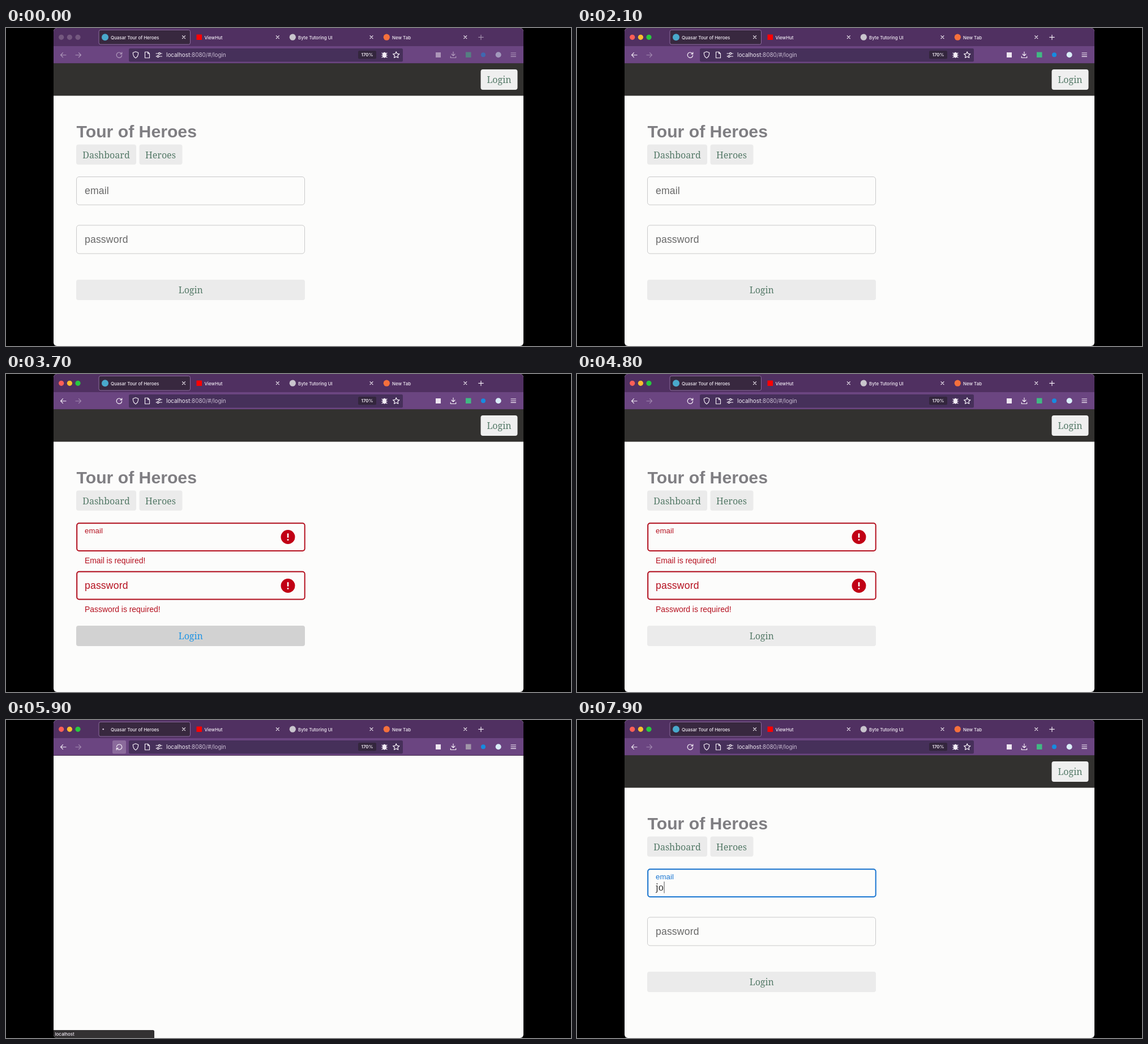
Animation, 998 px wide and 561 px high, one loop 8000 ms. Source, as an HTML page:

```html
<!DOCTYPE html>
<html lang="en">
<head>
<meta charset="utf-8">
<title>Login form</title>
<style>
html, body { margin: 0; width: 100%; height: 100%; overflow: hidden; background: #000; }
svg { display: block; width: 998px; height: 561px; }
text { white-space: pre; }
.ui { font-family: Inter, sans-serif; font-size: 7.9px; font-weight: 500; fill: #f3edf6; }
.url { font-size: 9.9px; font-weight: 400; }
.sans { font-family: "Liberation Sans", Arial, sans-serif; }
.serif { font-family: "Noto Serif", serif; font-size: 16px; fill: #557a68; }
.mid { text-anchor: middle; }
.label { font-size: 17.6px; letter-spacing: .00937em; fill: #686868; }
.msg { font-size: 13.9px; fill: #b5101f; }
.line { fill: none; stroke: #f6f0f8; stroke-width: 1.15; stroke-linecap: round; stroke-linejoin: round; }
.btn { fill: #ebebeb; }
.base { fill: none; stroke: #c9c9c9; }
.over { fill: none; stroke: #b5101f; stroke-width: 2; }
</style>
</head>
<body>
<svg viewBox="0 0 998 561">
  <defs>
    <clipPath id="window"><rect x="84" width="830" height="561" rx="6"/></clipPath>
    <g id="cross"><path class="line" d="M-2.5-2.5l5 5M2.5-2.5l-5 5"/></g>
    <g id="alert">
      <circle r="12.5" fill="#c10015"/>
      <path d="M-1.3-6.3h2.6v7.6h-2.6zM-1.3 3.7h2.6v2.6h-2.6z" fill="#fff"/>
    </g>
  </defs>
  <g clip-path="url(#window)">
    <rect x="84" width="830" height="561" fill="#fcfcfb"/>
    <rect x="84" width="830" height="32" fill="#503061"/>
    <rect x="84" y="32" width="830" height="30.5" fill="#6b4581"/>
    <rect x="84" y="62" width="830" height="1" fill="#47304f"/>

    <g id="lights">
      <circle cx="97.7" cy="16.3" r="4.6"/>
      <circle cx="112.4" cy="16.3" r="4.6"/>
      <circle cx="127" cy="16.3" r="4.6"/>
    </g>

    <rect x="164" y="3.5" width="161.5" height="25.5" rx="3" fill="#38283f" stroke="#8c6a9e"/>
    <circle id="favicon" cx="175" cy="16.2" r="6" fill="#49a9cc"/>
    <circle id="busy" cx="171.7" cy="16.2" r="1.3" fill="#d8cbe0"/>
    <rect x="336.5" y="11.5" width="9.5" height="9.5" fill="#f00"/>
    <circle cx="506.3" cy="16.2" r="5.6" fill="#c9c5cd"/>
    <circle cx="672.3" cy="16.2" r="5.6" fill="#f5703c"/>
    <g class="ui">
      <text x="185" y="19.6">Quasar Tour of Heroes</text>
      <text x="350.5" y="19.6">ViewHut</text>
      <text x="516" y="19.6">Byte Tutoring UI</text>
      <text x="682" y="19.6">New Tab</text>
    </g>
    <use href="#cross" x="314" y="16.2"/>
    <use href="#cross" x="479.8" y="16.2"/>
    <use href="#cross" x="645.5" y="16.2"/>
    <use href="#cross" x="811.3" y="16.2"/>

    <rect id="reloadBg" x="188" y="36" width="24" height="23.5" rx="2.5" fill="#8b6b9c"/>
    <g id="tools">
      <path class="line" d="M839 12.2v8.4M834.8 16.4h8.4"/>
      <path class="line" d="M106 47.7h-9.5m4-4l-4 4l4 4"/>
      <path id="reload" class="line" d="M203.6 44.8a4.7 4.7 0 1 0 1 3.3M204.8 42.7v3.1h-3.1"/>
      <rect x="759" y="43" width="9" height="9" fill="#eee6f1"/>
      <path class="line" d="M790 42v7m-3-3l3 3l3-3M785.3 50v2.5h9.4V50"/>
      <rect id="addon" x="812" y="42.5" width="9.5" height="9.5"/>
      <circle cx="843" cy="47.2" r="4" fill="#168be0"/>
      <circle cx="869.7" cy="47.2" r="5" fill="#d9edf8"/>
      <path class="line" d="M892 44h8.5M892 47.2h8.5M892 50.4h8.5"/>
    </g>
    <path id="forward" class="line" d="M123 47.7h9.5m-4-4l4 4l-4 4" opacity=".4"/>

    <rect x="217" y="36" width="484" height="23.5" rx="2.5" fill="#46305a"/>
    <path class="line" d="M229 41.7l4.7 1.8c0 5-1.4 7.7-4.7 9.4c-3.300-1.700-4.700-4.400-4.700-9.400z"/>
    <path class="line" d="M245.500 42.200h5l3 3v7.500h-8zM250.500 42.200v3h3"/>
    <path class="line" d="M265 45h4M273 45h2.500M265 50h1.500M270.500 50h5"/>
    <circle class="line" cx="271" cy="45" r="1.6"/>
    <circle class="line" cx="268.500" cy="50" r="1.6"/>
    <text class="ui url" x="283" y="51.300">localhost<tspan fill="#c9bcd2">:8080/#/login</tspan></text>
    <rect x="622" y="40" width="32" height="14.500" rx="2.500" fill="#33263d"/>
    <text class="ui mid" x="638" y="50.300" style="font-weight:600">170%</text>
    <path class="line" d="M664 44l2 1.500M673 44l-2 1.500M663.500 48h10M664 52l2-1.500M673 52l-2-1.500"/>
    <ellipse cx="668.500" cy="47.700" rx="3.400" ry="5" fill="#f3edf6"/>
    <path class="line" d="M689.200 41.700l1.700 3.700l4 .4l-3 2.700l.9 4l-3.600-2.100l-3.600 2.100l.9-4l-3-2.700l4-.4z"/>

    <g id="page">
      <rect x="84" y="62.500" width="830" height="57" fill="#32312f"/>
      <rect x="838.500" y="73" width="65" height="36" rx="4" fill="#efefef"/>
      <text class="serif mid" x="871" y="97">Login</text>
      <text class="sans" x="124.500" y="193" font-size="30.200" font-weight="700" fill="#7f7e82">Tour of Heroes</text>
      <rect class="btn" x="124" y="205.500" width="106" height="35.500" rx="4"/>
      <rect class="btn" x="235.500" y="205.500" width="76" height="35.500" rx="4"/>
      <text class="serif mid" x="177" y="229.700">Dashboard</text>
      <text class="serif mid" x="273" y="229.700">Heroes</text>

      <rect class="base" x="124.500" y="262.500" width="403" height="49.500" rx="4.500"/>
      <rect class="base" x="124.500" y="348" width="403" height="50" rx="4.500"/>
      <rect id="emailBox" class="over" x="125.200" y="263.300" width="402.500" height="48.700" rx="4"/>
      <rect id="passBox" class="over" x="125.200" y="348.800" width="402.500" height="48.700" rx="4"/>
      <text id="email" class="sans label" x="139">email</text>
      <text id="password" class="sans label" x="139" y="379">password</text>
      <text id="typed" class="serif" x="139" y="301" style="fill:#333"></text>
      <path id="caret" stroke="#555" d="M0 285v20.500"/>
      <g id="alerts">
        <use href="#alert" x="498" y="287.500"/>
        <use href="#alert" x="498" y="373.500"/>
      </g>
      <g id="messages">
        <text class="sans msg" x="139" y="334">Email is required!</text>
        <text class="sans msg" x="139" y="420.300">Password is required!</text>
      </g>
      <rect id="submit" x="124" y="444" width="404" height="36" rx="4"/>
      <text id="submitText" class="serif mid" x="326.300" y="468.300">Login</text>
    </g>

    <g id="status">
      <path d="M84 547h175.500a2.500 2.500 0 0 1 2.500 2.500V561H84z" fill="#333132"/>
      <text class="ui" x="86.500" y="557.200">localhost</text>
    </g>
  </g>
</svg>
<script>
const LOOP = 8000;
const RED = '#b5101f', BLUE = '#1976d2', GREY = '#686868';
const ACTIVE = 500;
const HOVER = [2400, 3900];
const FAIL = 2840, FAIL_TEXT = 2900;
const RELOAD_HOVER = [5300, 6300];
const BLANK = [5500, 6100];
const FOCUS = 7200;
const KEYS = [7650, 7850];
const TEXT = 'jo';

const $ = id => document.getElementById(id);
const within = (t, [from, to]) => t >= from && t < to;
const show = (id, on) => $(id).setAttribute('opacity', +on);
const fill = (id, color) => { $(id).style.fill = color; };

// cubic-bezier(.4, 0, .2, 1)
function ease(x) {
  if (x <= 0) return 0;
  if (x >= 1) return 1;
  let lo = 0, hi = 1, s;
  for (let i = 0; i < 20; i++) {
    s = (lo + hi) / 2;
    const r = 1 - s;
    if (1.2 * r * r * s + .6 * r * s * s + s ** 3 < x) lo = s; else hi = s;
  }
  return 3 * s * s - 2 * s ** 3;
}

function drawWindow(t) {
  const active = t >= ACTIVE;
  const loading = within(t, BLANK);
  const colors = active ? ['#fe5f57', '#febc2e', '#28c840'] : ['#74587f', '#74587f', '#74587f'];
  [...$('lights').children].forEach((dot, i) => dot.setAttribute('fill', colors[i]));
  show('tools', active ? 1 : .5);
  show('forward', active ? .4 : .5);
  show('favicon', !loading);
  show('busy', loading);
  fill('addon', loading ? '#a095a8' : '#41b883');
  show('reloadBg', within(t, RELOAD_HOVER));
  $('reload').setAttribute('transform', `rotate(${loading ? 180 : 0} 200 47.7)`);
  show('page', !loading);
  show('status', loading);
}

function drawForm(t) {
  const failed = t >= FAIL && t < BLANK[0];
  const focused = t >= FOCUS;
  const start = failed ? FAIL : FOCUS;
  const k = failed || focused ? ease((t - start) / 360) : 0;
  const tint = failed ? RED : focused ? BLUE : GREY;

  const label = $('email');
  label.setAttribute('y', 293 - 12 * k);
  label.style.fontSize = 17.6 * (1 - .25 * k) + 'px';
  fill('email', tint);
  fill('password', failed ? RED : GREY);
  $('emailBox').style.stroke = tint;
  show('emailBox', k);
  show('passBox', failed ? k : 0);
  show('alerts', failed);

  const m = failed ? ease((t - FAIL_TEXT) / 600) : 0;
  show('messages', m);
  $('messages').setAttribute('transform', `translate(0 ${-13 * (1 - m)})`);

  const count = KEYS.filter(key => t >= key).length;
  $('typed').textContent = TEXT.slice(0, count);
  const since = t - (count ? KEYS[count - 1] : start);
  show('caret', (failed || focused) && since % 1000 < 500);
  const x = 139.5 + (count ? $('typed').getComputedTextLength() + .5 : 0);
  $('caret').setAttribute('transform', `translate(${x} 0)`);

  const hover = within(t, HOVER);
  fill('submit', hover ? '#d2d2d2' : '#ebebeb');
  fill('submitText', hover ? '#1f94e4' : '#557a68');
}

function frame() {
  const t = performance.now() % LOOP;
  drawWindow(t);
  drawForm(t);
  requestAnimationFrame(frame);
}
frame();
</script>
</body>
</html>
```
